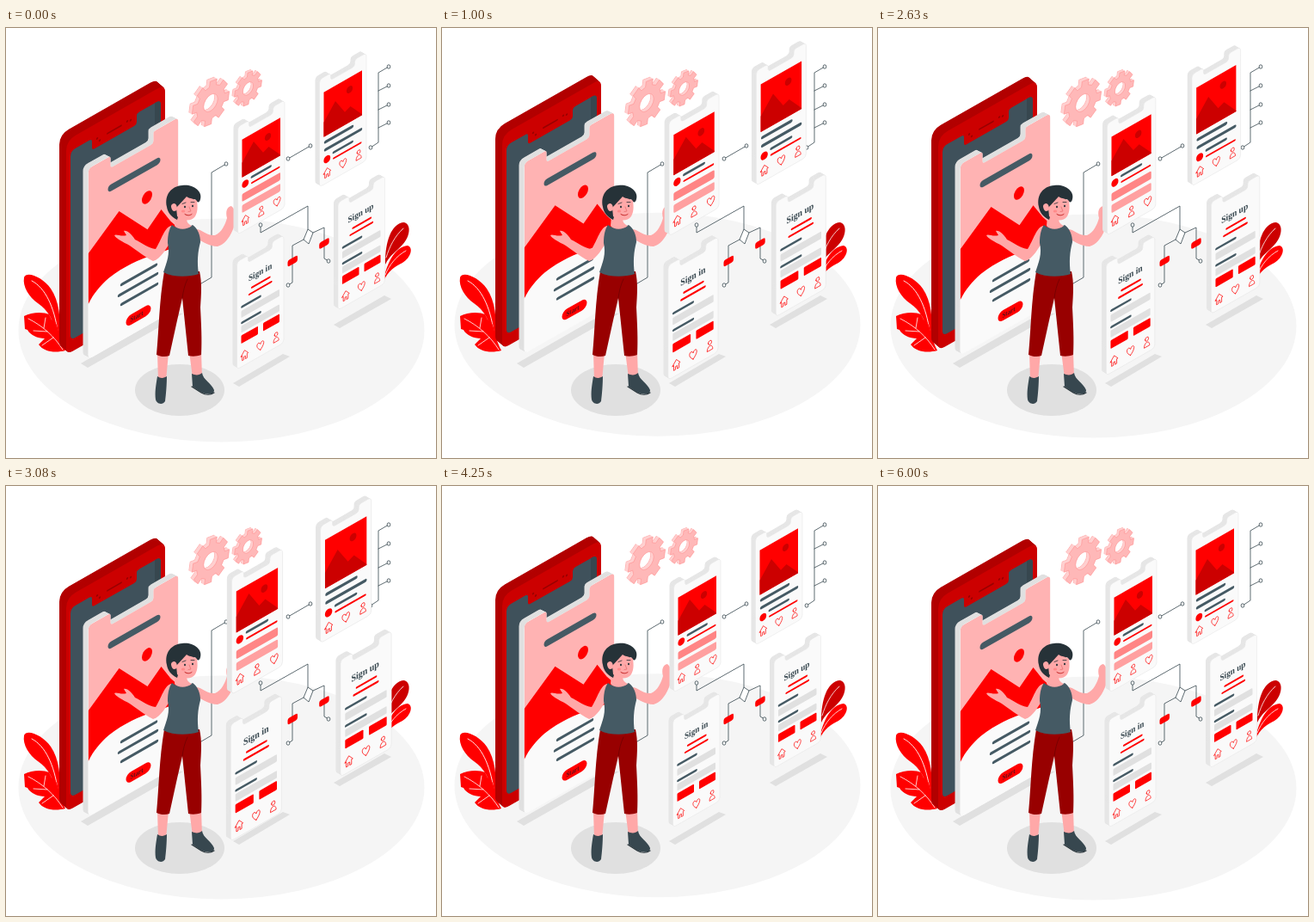
Animation, 500 px wide and 500 px high, one loop 6.04 s. Source, as an HTML page:

```html
<!DOCTYPE html>
<html lang="en">
<head>
<meta charset="utf-8">
<title>App screens</title>
<style>
html, body { margin: 0; width: 100%; height: 100%; overflow: hidden; background: #fff; }
svg { display: block; width: 100vw; height: 100vh; }
text { font-family: "Liberation Serif", "Noto Serif", serif; font-weight: bold; }
</style>
</head>
<body>
<svg id="stage" viewBox="0 0 500 500"></svg>
<script>
const RED = '#ff0000', DARK_RED = '#cc0000', WALL_RED = '#b20000', SLATE = '#455a64', INK = '#37474f';
const SKIN = '#ffa8a8', HAIR = '#263238', WHITE = '#fafafa', GREY = '#e0e0e0';

const path = (d, fill, extra = '') => `<path d="${d}" fill="${fill}" ${extra}/>`;
const stroke = (d, color, width, extra = '') =>
  `<path d="${d}" fill="none" stroke="${color}" stroke-width="${width}" stroke-linecap="round" stroke-linejoin="round" ${extra}/>`;
const bar = (x1, x2, y, color, width) => stroke(`M${x1} ${y}H${x2}`, color, width);
const rect = (x, y, w, h, fill, r = 1) =>
  `<rect x="${x}" y="${y}" width="${w}" height="${h}" rx="${r}" fill="${fill}"/>`;
const ellipse = (x, y, rx, ry, fill, extra = '') =>
  `<ellipse cx="${x}" cy="${y}" rx="${rx}" ry="${ry}" fill="${fill}" ${extra}/>`;
const group = (content, attrs = '') => `<g ${attrs}>${content}</g>`;
const iso = (x, y, content) => group(content, `transform="matrix(1 -.57 0 1 ${x} ${y})"`);
const isoText = (x, y, size, fill, words) =>
  `<text transform="translate(${x} ${y}) scale(.866 1)" font-size="${size}" fill="${fill}">${words}</text>`;

// Rounded slab with a notch in the top edge
function notched(w, h, r, n1, n2, d) {
  return `M0 ${r}Q0 0 ${r} 0H${n1 - 3}q3 0 3 3V${d - 3}q0 3 3 3H${n2 - 3}q3 0 3-3V3q0-3 3-3` +
    `H${w - r}Q${w} 0 ${w} ${r}V${h - r}Q${w} ${h} ${w - r} ${h}H${r}Q0 ${h} 0 ${h - r}Z`;
}

// Copies of a face from back to front, making the side walls
function extrude(x, y, dx, dy, d, fill) {
  const n = Math.abs(dx) * 2;
  let out = '';
  for (let i = n; i > 0; i--) out += iso(x + dx * i / n, y + dy * i / n, path(d, fill));
  return out;
}

function floorShadows() {
  return path('M87 390L190 331L206 332L95 395Z', GREY) +
    path('M264 413L322 379L330 382L271 417Z', GREY) +
    path('M381 345L440 311L448 315L388 349Z', GREY) +
    ellipse(202, 421, 52, 30, GREY);
}

function leaves() {
  return path('M62 358C64 338 62 318 52 303C43 290 24 282 21 290C19 301 27 313 37 320C49 328 55 340 60 358Z', RED) +
    stroke('M30 294C46 302 56 325 60 352', '#fff', .9) +
    path('M21 335C30 330 44 330 50 333L53 339L58 343C62 352 62 362 69 375C58 378 44 377 38 368L45 361C37 361 28 357 25 351L22 350Z', RED) +
    stroke('M26 338C42 346 56 358 66 374M44 349L46 337M55 360L42 369M48 353L32 352', '#fff', .8) +
    path('M441 273C441 248 448 228 462 226C472 227 470 243 461 252C454 260 446 264 441 275Z', DARK_RED) +
    path('M438 296C443 274 451 255 467 253C474 255 471 267 461 273C452 278 445 281 438 296Z', RED) +
    stroke('M462 233C452 242 446 254 442 267M465 259C454 265 446 275 441 287', '#fff', .8);
}

function bigPhone() {
  const body = 'M0 12Q0 0 11 0H106Q115 0 115 9V239Q115 249 106 249H8Q0 249 0 241Z';
  const screen = notched(105, 220, 6, 25, 77, 13);
  const dots = [[36, 18], [39, 22], [71, 18], [75, 19]].map(([x, y]) => ellipse(x, y, 1.2, 1.2, '#990000')).join('');
  return extrude(70, 131, -8, -7, body, WALL_RED) +
    iso(70, 131, path(body, DARK_RED) +
      group(path(screen, '#3f515b') + path('M98 0H100Q105 0 105 6V220H98Z', INK), 'transform="translate(5 15)"') +
      bar(48, 64, 19, '#990000', 1.8) + dots);
}

function bigPanel() {
  const face = notched(105, 222, 6, 26, 76, 14);
  return extrude(95.5, 163.5, -6, -3, face, GREY) +
    iso(95.5, 163.5, path(face, WHITE) +
      `<clipPath id="face"><path d="${face}"/></clipPath>` +
      group(path('M0 0H105V150H0Z', '#ffb3b3') +
        path('M0 158C6 149 14 144 24 141C42 137 60 140 74 143L105 150V222H0Z', WHITE) +
        path('M0 99L36 70L69 110L85 96L96 116L105 129V150L74 143C60 140 42 137 24 141C14 144 6 149 0 158Z', RED),
        'clip-path="url(#face)"') +
      bar(27, 80, 37.5, SLATE, 8) +
      ellipse(68.5, 72.5, 6, 7, RED) +
      bar(39, 79, 157, SLATE, 3.4) + bar(36, 80, 168, SLATE, 3.4) + bar(39, 80, 180, SLATE, 3.4) +
      bar(50, 67, 204, RED, 12) + isoText(49, 206.5, 8, '#601018', 'Start'));
}

function gear(x, y, r, depth) {
  const teeth = 8, points = [];
  for (let i = 0; i < teeth; i++) {
    for (const [a, k] of [[-.31, .76], [-.24, 1], [.24, 1], [.31, .76]]) {
      const angle = (i + a + .2) / teeth * 2 * Math.PI;
      points.push((Math.cos(angle) * r * k).toFixed(1) + ' ' + (Math.sin(angle) * r * k).toFixed(1));
    }
  }
  const h = r * .38;
  const d = `M${points.join('L')}ZM${h} 0A${h} ${h} 0 1 0 ${-h} 0A${h} ${h} 0 1 0 ${h} 0Z`;
  const layer = (s, fill, edge) => group(
    path(d, fill, `fill-rule="evenodd" stroke="${edge}" stroke-width=".5" stroke-linejoin="round"`),
    `transform="matrix(.866 -.5 0 1 ${x - s} ${y - s * .6})"`);
  let out = layer(depth, '#ffd0d0', '#ff8080');
  for (let s = depth - .5; s > 0; s -= .5) out += layer(s, '#ffd0d0', '#ffd0d0');
  return out + layer(0, '#ffb8b8', '#ff8a8a');
}

function links() {
  const nodes = [[256, 158], [328, 152], [354, 137], [424, 139], [445, 45], [445, 67], [445, 89],
    [445, 110], [296, 229], [328, 299], [375, 271]];
  const lines = 'M256 158L239 168V290L222 300M328 152L354 137M424 139L433 133V52L445 45' +
    'M433 73L445 67M433 95L445 89M433 116L445 110M296 229V238L351 207V234' +
    'M346 246L333 253V296L328 299M357 238L370 232V268L375 271';
  return stroke(lines, INK, .8) +
    path('M351 234L357 238L352 251L346 246Z', '#fff', `stroke="${INK}" stroke-width=".8"`) +
    nodes.map(([x, y]) => ellipse(x, y, 1.9, 2.2, '#fff', `stroke="${INK}" stroke-width=".8"`)).join('') +
    iso(327.5, 270.5, rect(0, 0, 11.5, 7.5, RED, 2.2)) + iso(364.2, 250, rect(0, 0, 11.5, 7.5, RED, 2.2));
}

function woman() {
  const arms = path('M192 230C184 232 181 246 174 257C166 256 158 250 150 246C146 240 141 235 137 236L140 241C134 243 128 239 126 241C128 245 134 247 138 250C146 253 160 266 171 271C180 269 187 255 193 246Z', SKIN) +
    path('M221 234C228 234 233 242 243 241C251 238 255 228 257 221C255 213 257 208 262 207C268 211 269 224 264 234C259 246 253 252 246 254C236 254 229 248 223 246Z', SKIN);
  const legs = path('M176 378H189L186 410H177Z M213 376H227L228 407H217Z', SKIN);
  const boots = path('M176 405C180 408 184 407 187 405C187 414 186 427 185 434C182 439 175 437 174 432C173 424 174 417 176 405Z', INK) +
    path('M216 402C220 404 225 404 228 401C229 409 239 413 242 421C242 427 233 427 226 423L217 417Z', INK) +
    stroke('M216 417L227 424C232 427 238 427 242 424', HAIR, 1.2);
  const trousers = path('M184 283H225C228 296 227 310 226 325C227 345 228 362 227 380C222 382 216 382 212 381L205 314L199 340L190 381C185 383 179 382 175 380C178 349 178 318 184 283Z', '#980000') +
    stroke('M205 314C206 306 208 298 211 292', '#700000', .8);
  const top = path('M193 229C199 234 209 234 217 229C223 233 226 241 226 249C223 260 222 272 224 286C212 290 194 290 183 284C187 272 191 263 188 250C188 240 190 233 193 229Z', SLATE);
  const head = path('M197 218L196 230C200 235 210 235 216 230C212 228 210 226 210 221Z', SKIN) +
    path('M187 208C184 194 192 184 205 183C216 181 229 189 226 199C225 204 222 203 220 199L204 207L199 223C191 219 188 214 187 208Z', HAIR) +
    path('M198 209C202 205 206 200 210 196C214 199 219 198 222 201C223 208 223 214 220 219C216 225 205 225 199 219Z', SKIN) +
    ellipse(195.5, 208.5, 3.3, 4.5, SKIN, 'transform="rotate(-15 195.5 208.5)"') +
    ellipse(208, 208, 1, 1.3, HAIR) + ellipse(217, 207, 1, 1.3, HAIR) +
    stroke('M205 204.5L209 203M215 202.5L219 202.5', HAIR, .8) +
    stroke('M213 208L215 213L212 213.5', '#e46a6a', .7) +
    stroke('M208 216.5C211 218.5 214 218 216 216.5', '#b00000', .8) +
    ellipse(206, 213, 2.2, 1.6, '#ff8a8a');
  return legs + boots + arms + trousers + top + head;
}

const ICONS = {
  home: 'M-4.5 0L0 -5.5L4.5 0H3V5.5H1V2H-1V5.5H-3V0Z',
  heart: 'M0 5C-6 0 -4.5 -5 -2 -4.5Q-.5 -4 0 -2Q.5 -4 2 -4.5C4.5 -5 6 0 0 5Z',
  person: 'M-2 -3A2 2.3 0 1 0 2 -3A2 2.3 0 1 0 -2 -3ZM-3.2 5.5C-3.2 -1 3.2 -1 3.2 5.5Z'
};

function smallPhone(x, y, icons, content) {
  const face = notched(54.5, 125, 4, 13, 41, 8);
  const row = icons.map((name, i) =>
    group(stroke(ICONS[name], RED, .65), `transform="translate(${9 + i * 18.3} 113) scale(.95)"`)).join('');
  return extrude(x, y, -5, -3, face, '#e6e6e6') +
    iso(x, y, path(face, WHITE, 'stroke="#e6e6e6" stroke-width=".5"') + content + row);
}

function picture(h, sky, hills) {
  const b = 17.5 + h;
  return rect(5, 17.5, 44.5, h, sky, 0) +
    path(`M5 ${b}V${b - 17}L18.5 ${b - 34}L29.5 ${b - 15}L36 ${b - 18}L49.5 ${b - 1}V${b}Z`, hills) +
    ellipse(35, 31.5, 3.6, 4, hills);
}

const caption = y => ellipse(8.8, y, 3.9, 4.2, RED) +
  bar(16.5, 38, y - 3.5, SLATE, 2.8) + bar(16.5, 48, y + 3.3, RED, 2);

const form = (words, x) => isoText(x, 30.5, 10.6, INK, words) +
  bar(17.5, 38, 39.5, RED, 2.2) + bar(14.5, 40, 46, RED, 2.2) +
  bar(6, 27, 55.5, SLATE, 2.6) + rect(5, 60, 44.5, 8, GREY) +
  bar(6, 27, 74, SLATE, 2.6) + rect(5, 77.5, 44.5, 8, GREY) +
  rect(5, 88.5, 19.5, 9.5, RED) + rect(30.5, 88.5, 19, 9.5, RED);

function smallPhones() {
  return smallPhone(364.5, 60, ['home', 'heart', 'person'],
      picture(52, RED, DARK_RED) + bar(7, 38, 76.5, SLATE, 3.4) + bar(7, 48, 85.5, SLATE, 3.4) + caption(97.5)) +
    smallPhone(269.5, 115, ['home', 'person', 'heart'],
      picture(44, RED, DARK_RED) + caption(71) +
      rect(5, 81, 44.5, 9, '#ff8585', 1.5) + rect(5, 94, 44.5, 9, '#ffa0a0', 1.5)) +
    smallPhone(386, 203, ['home', 'heart', 'person'], form('Sign up', 11.5)) +
    smallPhone(268.5, 272, ['home', 'heart', 'person'], form('Sign in', 13.5));
}

document.getElementById('stage').innerHTML =
  group(ellipse(250.5, 351.5, 236, 130, '#f5f5f5'), 'class="bob"') +
  floorShadows() + leaves() +
  group(bigPhone() + bigPanel(), 'class="bob"') +
  gear(238, 87, 25, 3.5) + gear(281.5, 70.5, 18.5, 2.5) +
  links() + woman() +
  group(smallPhones(), 'id="pulse"');

const LOOP = 6040, SPAN = 6000, BOB = 1500;
const PULSE = [[0, 1], [600, 1.1], [1800, 1], [2400, 1], [3000, 1.1], [3600, 1], [SPAN, 1]];
const bobbers = document.querySelectorAll('.bob');
const pulse = document.getElementById('pulse');

function valueAt(steps, t) {
  const i = Math.max(1, steps.findIndex(step => t <= step[0]));
  const [t0, v0] = steps[i - 1], [t1, v1] = steps[i];
  return v0 + (v1 - v0) * (t - t0) / (t1 - t0);
}

function draw() {
  const t = Math.min(performance.now() % LOOP, SPAN);
  const phase = (t % BOB) / BOB;
  const lift = -10 * (1 - Math.abs(1 - 2 * phase));
  bobbers.forEach(el => el.setAttribute('transform', `translate(0 ${lift})`));
  pulse.setAttribute('transform', `translate(352.5 211.5) scale(${valueAt(PULSE, t)}) translate(-352.5 -211.5)`);
  requestAnimationFrame(draw);
}
draw();
</script>
</body>
</html>
```
